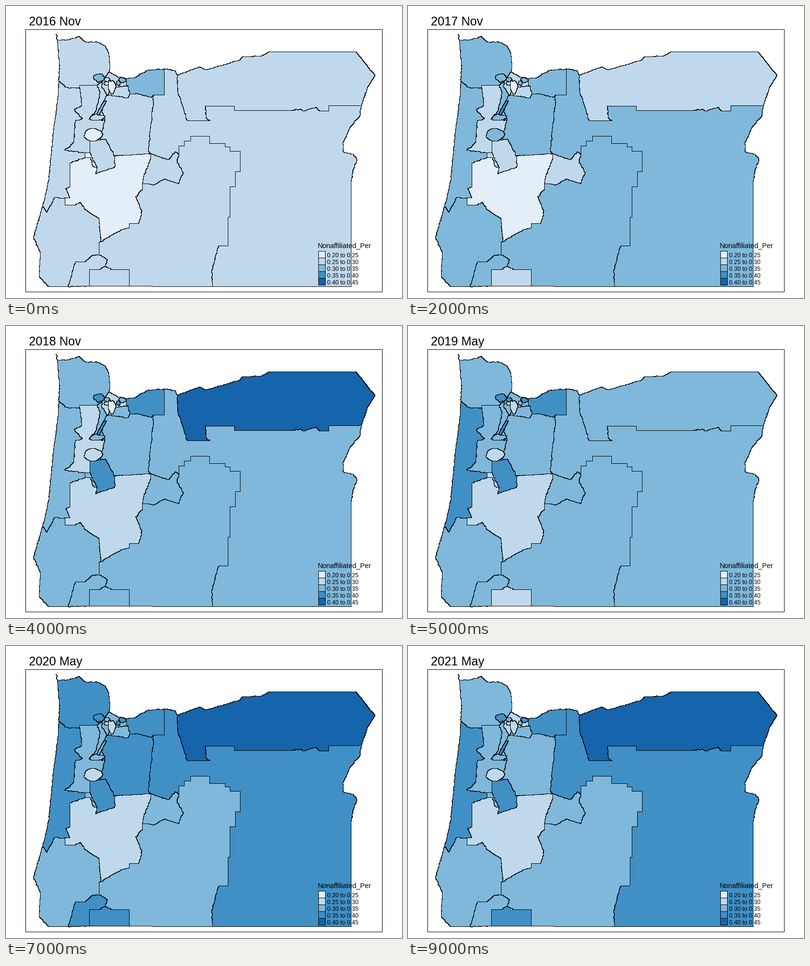
A matplotlib script that plays this animation: 814 px wide and 602 px high, repeating every 10000 ms.

```python
import numpy as np
import matplotlib.pyplot as plt
from matplotlib.animation import FuncAnimation
from matplotlib.collections import LineCollection, PolyCollection
from matplotlib.patches import Rectangle

W, H, DPI = 814, 602, 64
PX = 72 / DPI
SHADES = ["#E3EEF8", "#C0D8EC", "#7FB8DA", "#4090C6", "#1664AC"]
TITLES = ["2016 Nov"] + [f"{y} {m}" for y in range(2017, 2021)
                         for m in ("May", "Nov")] + ["2021 May"]
rng = np.random.default_rng(4)
borders = []


def wiggly(pts, rough):
    """Pixel path through key points; level and upright parts stay straight."""
    out = [pts[0]]
    for (x0, y0), (x1, y1) in zip(pts, pts[1:]):
        dx, dy = x1 - x0, y1 - y0
        n = max(abs(dx), abs(dy))
        t = np.linspace(0, 1, n + 1)
        off = np.zeros(n + 1)
        if dx and dy:
            knots = rng.uniform(-rough, rough, max(2, n // 3 + 1))
            knots[[0, -1]] = 0
            off = np.interp(t, np.linspace(0, 1, len(knots)), knots) / np.hypot(dx, dy)
        x = np.rint(x0 + dx * t - dy * off).astype(int)
        y = np.rint(y0 + dy * t + dx * off).astype(int)
        out += list(zip(x.tolist(), y.tolist()))[1:]
    return out


def arc(*pts, rough=1.3):
    borders.append(wiggly(pts, rough))
    return borders[-1]


def stairs(x, y, *turns):
    """Corners of a staircase: the turns give y and x values by turns."""
    pts = [(x, y)]
    for i, v in enumerate(turns):
        x, y = (v, y) if i % 2 else (x, v)
        pts.append((x, y))
    return pts


def blob(cx, cy, rx, ry):
    """Ragged town outline."""
    a = np.linspace(0, 2 * np.pi, 15)[:-1]
    r = rng.uniform(0.72, 1.08, len(a))
    pts = [(int(x), int(y)) for x, y in zip(cx + rx * r * np.cos(a),
                                            cy + ry * r * np.sin(a))]
    return wiggly(pts + pts[:1], 0.5)


def join(*arcs):
    """Chain arcs into one ring, turning each one as needed."""
    first, second = arcs[:2]
    ring = list(first)
    if ring[-1] not in (second[0], second[-1]):
        ring.reverse()
    for a in arcs[1:]:
        ring += a if a[0] == ring[-1] else a[::-1]
    return ring


# Outer edge of the state
arc((102, 58), (105, 62), (103, 65), (105, 70))
nw_edge = arc((108, 154), (109, 120), (105, 70), (130, 69), (150, 62), (163, 74),
              (185, 73), (203, 81), (211, 97), (213, 124), (211, 136), rough=1)
gorge_w = arc((211, 136), (232, 146), (247, 149))
gorge_e = arc((247, 149), (262, 148), (291, 132), (325, 129))
river = arc((325, 129), (347, 133), (352, 142))
ne_edge = arc((352, 142), (397, 125), (409, 131), (440, 123), (480, 111),
              (486, 104), (527, 102), (540, 94), (719, 94), (758, 142),
              (742, 169), (730, 205), rough=1)
e_edge = arc((730, 205), (726, 228), (709, 247), (692, 283), (693, 300),
             (714, 305), (721, 317), (714, 336), (709, 361), (709, 578))
s_edge = arc((709, 578), (424, 578))
s_mid = arc((424, 578), (300, 578), (300, 577), (253, 577))
s_med = arc((253, 577), (171, 577))
s_inner = arc((171, 577), (127, 578))
s_west = arc((127, 578), (87, 578))
sw_edge = arc((87, 578), (68, 558), (70, 509), (56, 476), (75, 413), rough=1)
w_edge = arc((75, 413), (87, 360), (97, 258), (106, 190), (108, 154), rough=0.8)

# Inner borders, west
coast_n = arc((108, 154), (122, 167), (151, 169))
nw_step = arc((151, 169), (151, 163), (187, 163))
nw_s = arc((187, 163), (198, 153))
metro_w = arc((198, 153), (211, 136))
valley_w = arc((151, 169), (155, 205), (140, 213), (157, 232), (142, 236),
               (139, 280), (120, 297), (162, 302))
bit_w = arc((162, 302), (162, 312))
bit_n = arc((162, 302), (172, 302))
bit_s = arc((187, 332), (178, 330), (173, 312), (162, 312))
lane_w = arc((162, 312), (131, 323), (131, 373), (122, 376), (131, 395), (121, 395))
coast_s = arc((121, 395), (99, 394), (84, 425), (75, 413))
lane_s = arc((121, 395), (121, 410), (142, 410), (152, 404), (163, 420),
             (190, 437), (195, 485))
lane_se = arc((195, 485), (238, 460), (253, 457), (253, 448), (272, 448),
              (279, 422), (266, 393), (280, 378), (280, 366))
lane_e = arc((280, 366), (283, 350), (297, 315), (297, 304))
strip_l = arc((187, 163), (193, 178), (185, 215), (170, 233))
strip_r = arc((207, 184), (196, 165), (198, 153))
strip_s = arc((170, 233), (203, 235))
mid_w = arc((207, 184), (195, 207), (203, 235))
mid_sw = arc((203, 235), (193, 276))
mid_s = arc((222, 308), (297, 304), rough=0.7)
mid_e = arc((297, 304), (292, 298), (298, 240), (302, 205), (303, 183))
mid_n = arc((303, 183), (299, 188), (268, 180), (254, 181))
foot = arc((254, 181), (250, 189), (212, 183), (207, 184))
hood_e = arc((325, 129), (325, 183), (303, 183))
hood_w = arc((254, 181), (247, 160), (247, 149))
town_s = arc((193, 276), (172, 276))
hill_w = arc((172, 276), (172, 302))
hill_sw = arc((172, 302), (187, 332))
hill_s = arc((187, 332), (184, 346), (223, 331), (222, 308))
hill_e = arc((193, 276), (204, 274), (222, 308))

# Inner borders, south and east
sw_e = arc((195, 485), (191, 487), (191, 513))
inner_n = arc((191, 513), (176, 514), (162, 527), (142, 527), (135, 552), (127, 578))
inner_e = arc((191, 513), (208, 522), (204, 536))
med_w = arc((204, 536), (190, 543), (171, 543), (171, 577))
med_e = arc((204, 536), (216, 543), (253, 543), (253, 577))
bend_n = arc((297, 304), (310, 309), (334, 316), (348, 300), (355, 306))
bend_e = arc((355, 306), (351, 322), (364, 343), (354, 366))
bend_s = arc((354, 366), (325, 356), (305, 368), (280, 366))
cen_n = arc(*stairs(355, 306, 288, 366, 278, 379, 268, 418, 283, 450, 290, 460,
                    299, 481, 341, 471, 372, 460, 435, 456, 494, 437),
            (422, 545), (424, 578))
ne_s = arc(*stairs(730, 205, 205, 663, 216, 644), (637, 208), (613, 216),
           (604, 212), (586, 215), (469, 215), (469, 206), (409, 206),
           (411, 230), (419, 236), (372, 236), (353, 177), (352, 142))

# (ring, shade index for each half-year)
AREAS = [
    (join(nw_edge, gorge_w, gorge_e, river, ne_edge, e_edge, s_edge, s_mid,
          s_med, s_inner, s_west, sw_edge, w_edge), "1122222323"),
    (join(ne_edge, ne_s), "1112422444"),
    (join(cen_n, s_mid, med_e, inner_e, sw_e, lane_se, bend_s, bend_e),
     "1122222222"),
    (join(bend_n, bend_e, bend_s, lane_e), "1112222222"),
    (join(nw_edge, metro_w, nw_s, nw_step, coast_n), "1222223322"),
    (join(w_edge, coast_n, valley_w, bit_w, lane_w, coast_s), "1222233323"),
    (join(sw_edge, coast_s, lane_s, sw_e, inner_n, s_west), "1122222222"),
    (join(inner_n, inner_e, med_w, s_inner), "1122222322"),
    (join(med_w, med_e, s_med), "1111211323"),
    (join(lane_w, lane_s, lane_se, lane_e, mid_s, hill_s, bit_s), "0000111111"),
    (join(strip_l, strip_s, mid_sw, town_s, hill_w, bit_n, valley_w, nw_step),
     "1111122222"),
    (join(nw_s, strip_r, mid_w, strip_s, strip_l), "1122222222"),
    (join(mid_n, foot, mid_w, mid_sw, hill_e, mid_s, mid_e), "1222223322"),
    (join(gorge_e, hood_e, mid_n, hood_w), "2122333333"),
    (join(hill_w, hill_sw, hill_s, hill_e, town_s), "1112333333"),
    (join(bit_n, hill_sw, bit_s, bit_w), "0111211222"),
    (join(gorge_w, hood_w, foot, strip_r, metro_w), "1111122211"),
]
TOWNS = [
    (blob(179, 264, 20, 14), "0122111111"),
    (blob(187, 230, 17, 7), "1122222222"),
    (wiggly([(206, 195), (190, 225), (186, 222), (194, 207), (200, 196),
             (206, 195)], 0.8), "2233333233"),
    (join(foot, wiggly([(207, 184), (219, 167), (250, 164), (254, 181)], 1.3)),
     "1111222222"),
    (blob(191, 148, 12, 10), "2222333333"),
    (blob(208, 152, 7, 5), "1222233222"),
    (blob(207, 160, 6, 4), "0011111111"),
    (blob(217, 166, 9, 15), "0000011101"),
    (blob(239, 153, 8, 6), "2222233323"),
    (blob(231, 159, 5, 6), "2222322332"),
]

fig = plt.figure(figsize=(W / DPI, H / DPI), dpi=DPI, facecolor="white")
ax = fig.add_axes([0, 0, 1, 1])
ax.set_xlim(0, W)
ax.set_ylim(H, 0)
ax.axis("off")


def centred(paths):
    return [np.array(p) + 0.5 for p in paths]


def box(x, y, w, h, fill):
    ax.add_patch(Rectangle((x + 0.5, y + 0.5), w, h, fc=fill, ec="black",
                           lw=PX, antialiased=False, snap=False, zorder=4))


def label(x, y, text, size):
    return ax.text(x, y, text, fontsize=size * PX, family="Liberation Sans",
                   color="black", va="baseline", zorder=5)


ink = dict(linewidths=PX, antialiaseds=False, snap=False)
land = PolyCollection(centred(r for r, _ in AREAS), linewidths=0,
                      antialiaseds=False, snap=False, zorder=1)
lines = LineCollection(centred(borders), colors="black", zorder=2, **ink)
towns = PolyCollection(centred(r for r, _ in TOWNS), edgecolors="black",
                       zorder=3, **ink)
for group in (land, lines, towns):
    ax.add_collection(group, autolim=False)

box(40, 48, 733, 541, "none")
title = label(47, 40, TITLES[0], 25)
label(640.7, 498, "Nonaffiliated_Per", 14.4)
for i, shade in enumerate(SHADES):
    box(642, 505 + 14 * i, 14, 14, shade)
    label(660, 518 + 14 * i, f"{0.2 + 0.05 * i:.2f} to {0.25 + 0.05 * i:.2f}", 12.1)


def draw(k):
    for group, parts in ((land, AREAS), (towns, TOWNS)):
        group.set_facecolor([SHADES[int(levels[k])] for _, levels in parts])
    title.set_text(TITLES[k])
    return land, towns, title


anim = FuncAnimation(fig, draw, frames=len(TITLES), interval=1000,
                     repeat=True, repeat_delay=0, blit=False)
plt.show()
```
